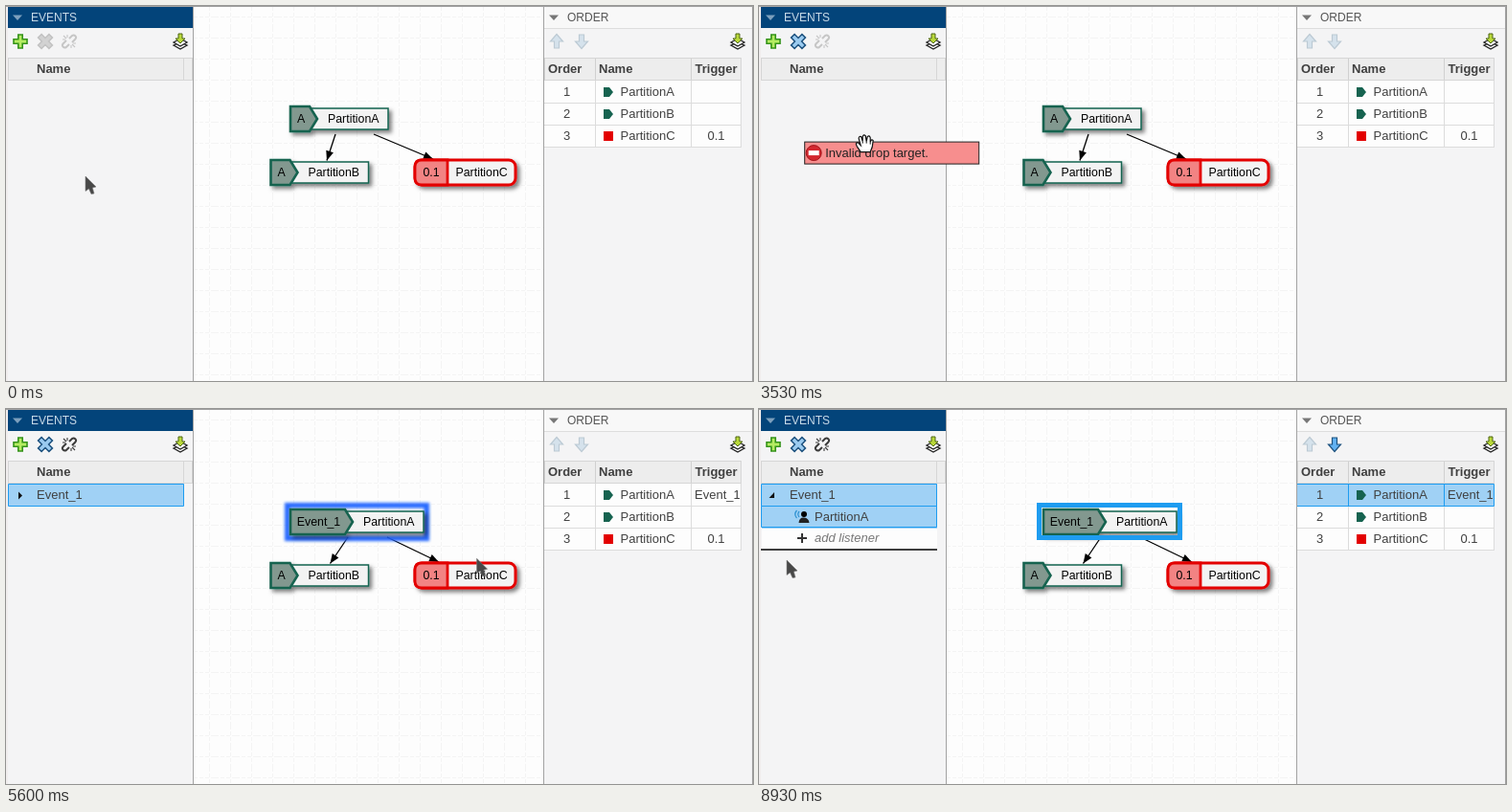
An HTML page that plays this animation: 780 px wide and 392 px high, repeating every 9400 ms.

```html
<!DOCTYPE html>
<html lang="en">
<head>
<meta charset="utf-8">
<title>Schedule editor</title>
<style>
  html, body { margin: 0; width: 100%; height: 100%; overflow: hidden; background: #fff; }
  svg { display: block; width: 780px; height: 392px; }
  text { font: 13px "Liberation Sans", Arial, sans-serif; fill: #404040; white-space: pre; }
  .cap { font-size: 12px; }
  .node { font-size: 12.35px; fill: #000; }
  .bold { font-weight: bold; }
  .hint { font-style: italic; fill: #777; }
</style>
</head>
<body>
<svg id="stage" viewBox="0 0 780 392">
  <defs>
    <filter id="shadow" x="-20%" y="-40%" width="150%" height="200%">
      <feDropShadow dx="3" dy="3" stdDeviation="2" flood-color="#000" flood-opacity=".5"/>
    </filter>
    <filter id="blur" x="-20%" y="-50%" width="140%" height="200%"><feGaussianBlur stdDeviation="1.6"/></filter>
    <pattern id="grid" x="196" y="1" width="22" height="22" patternUnits="userSpaceOnUse">
      <path d="M16.5 0V22M0 10.5H22" stroke="#f4f4f4" stroke-dasharray="4 2"/>
    </pattern>
    <clipPath id="trigger"><path d="M716 78H766V148H716Z"/></clipPath>
  </defs>
  <g id="base"></g>
  <g id="live"></g>
  <g id="pointer"></g>
</svg>
<script>
const LOOP = 9400;
const GREEN = '#166350', RED = '#e30000', BLUE = '#1e9cf0', PICKED = '#a0d1f5';
const EVENT_ADDED = 1330, PRESSED = 3060, DRAG = 3330, DROP = 4730, HAND_END = 5200,
      EXPAND = 7200, SELECT = 7400;
const $ = id => document.getElementById(id);

// Pointer path: time, x, y
const path = [
  [0, 83, 178], [30, 83, 178], [860, 12, 37], [1400, 12, 37], [2130, 17, 92], [2300, 17, 92],
  [2400, 20, 95], [2700, 65, 84], [3330, 65, 84], [3640, 150, 170], [4000, 294, 113],
  [4160, 331, 118], [5150, 331, 118], [5400, 430, 10], [5660, 497, 177], [5700, 497, 177],
  [6130, 260, 140], [6430, 124, 112], [6530, 146, 117], [6660, 146, 117], [6960, 13, 93],
  [8100, 13, 93], [8400, 99, 88], [8760, 28, 156], [8900, 28, 156], [8930, 29, 158], [LOOP, 29, 158]
];

const still = (a, b) => !a || !b || (a[1] === b[1] && a[2] === b[2]);

function slope(i, axis) {
  const [p, q, r] = [path[i - 1], path[i], path[i + 1]];
  return still(p, q) || still(q, r) ? 0 : (r[axis] - p[axis]) / (r[0] - p[0]);
}

function pointerAt(t) {
  const i = Math.max(0, path.findIndex(k => k[0] > t) - 1);
  const a = path[i], b = path[i + 1], span = b[0] - a[0], u = (t - a[0]) / span;
  const s = u * u * (3 - 2 * u);
  return [1, 2].map(n => a[n] + (b[n] - a[n]) * s +
    span * (slope(i, n) * u * (1 - u) ** 2 - slope(i + 1, n) * u * u * (1 - u)));
}

const text = (x, y, s, cls = '', extra = '') => `<text x="${x}" y="${y}" class="${cls}" ${extra}>${s}</text>`;
const rect = (x, y, w, h, fill, extra = '') =>
  `<rect x="${x}" y="${y}" width="${w}" height="${h}" fill="${fill}" ${extra}/>`;
const shape = (d, fill, stroke = 'none', width = 1, extra = '') =>
  `<path d="${d}" fill="${fill}" stroke="${stroke}" stroke-width="${width}" ${extra}/>`;
const line = (d, stroke, width = 1) => shape(d, 'none', stroke, width);
const at = (x, y, body) => `<g transform="translate(${x} ${y})">${body}</g>`;

const PLUS = 'M-2.2-7H2.2V-2.2H7V2.2H2.2V7H-2.2V2.2H-7V-2.2H-2.2Z';
const plusIcon = () => at(15, 37, shape(PLUS, '#b5ec62', '#35931b', 1.6));

function deleteIcon(on) {
  return `<g transform="translate(41 37) rotate(45) scale(1.15)">` +
    shape(PLUS, on ? '#9bcbf0' : '#d2d2d2', on ? '#1d527f' : '#c2c2c2', 1.3) + '</g>';
}

function unlinkIcon(on) {
  const c = on ? '#3c3c3c' : '#c6c6c6';
  return at(66, 37,
    line('M0-3 3-6Q5-7 6.500-5.500T6-2L3 1M0 3-3 6Q-5 7-6.500 5.500T-6 2L-3-1', c, 2) +
    line('M-6-6-3-3M3 3 6 6M-2-7V-4M-7-2H-4M2 4V7M4 2H7', c, 1.1));
}

function layersIcon(x) {
  return at(x, 37,
    shape('M-7 4 0 1 7 4 0 8Z', '#fff', '#222', 1.3) +
    shape('M-7 1 0-3 7 1 0 5Z', '#fff', '#222', 1.3) +
    shape('M-2-8H2V-3H5L0 2-5-3H-2Z', '#b9d83a', '#4c6512'));
}

function moveIcon(x, dir, on) {
  return `<g transform="translate(${x} 37) scale(1 ${dir})">` +
    shape('M-2.500-7H2.500V0H6.500L0 7.500-6.500 0H-2.500Z', on ? '#62b2f2' : '#d5e2ec', on ? '#1d527f' : '#bccad4', 1.2) + '</g>';
}

function arrow(x1, y1, x2, y2) {
  const turn = Math.atan2(y2 - y1, x2 - x1) * 180 / Math.PI;
  return line(`M${x1} ${y1}L${x2} ${y2}`, '#000', 1.3) +
    `<path transform="translate(${x2} ${y2}) rotate(${turn})" d="M0 0-10-4V4Z"/>`;
}

// Partition box with a pointed trigger tag on its left
function tagNode(x, y, tag, tagWidth, name, right) {
  const neck = x + tagWidth;
  return `<g filter="url(#shadow)">` + rect(x + 4, y + 2, right - x - 4, 22, '#f3f3f3', `stroke="${GREEN}" stroke-width="1.5"`) +
    shape(`M${x} ${y}H${neck}L${neck + 8} ${y + 13} ${neck} ${y + 26}H${x}Z`, '#82988f', GREEN, 2.6) + '</g>' +
    text(x + tagWidth / 2 + 1, y + 17, tag, 'node', 'text-anchor="middle"') +
    text(neck + 19, y + 17, name, 'node');
}

function timedNode() {
  const left = 'M461 161H434Q427 161 427 168V180Q427 187 434 187H461Z';
  return rect(427, 161, 105, 26, '#f3f3f3', `rx="7" stroke="${RED}" stroke-width="3" filter="url(#shadow)"`) +
    shape(left, '#f28383', RED, 2.8) +
    text(444, 178, '0.1', 'node', 'text-anchor="middle"') + text(469.5, 178, 'PartitionC', 'node');
}

function drawBase() {
  const title = (x, w, fill, tri, ink, label) => rect(x, 1, w, 22, fill) +
    shape(`M${x + 5} 9.500h10l-5 5.500z`, tri) + text(x + 24, 16, label, 'cap', `style="fill:${ink}"`);
  const head = (x, w) => rect(x, 54.5, w, 23, '#ededed', 'stroke="#d6d6d6"');
  $('base').innerHTML =
    rect(0, 0, 780, 392, '#f4f4f5') + rect(196, 0, 365, 392, '#fdfdfd') + rect(196, 1, 365, 391, 'url(#grid)') +
    rect(0, 0, 2, 392, '#f1eeee') +
    title(2, 193, '#03447a', '#7da0bd', '#c9dae8', 'EVENTS') + title(562, 218, '#f8f8f8', '#777', '#555', 'ORDER') +
    line('M562 23.500H780', '#ddd') +
    head(2.5, 183) + head(185.500, 9) + head(562.5, 205) + line('M615.500 55V77M715.500 55V77', '#d0d0d0') +
    text(32, 70, 'Name', 'bold') + text(566, 70, 'Order', 'bold') + text(619, 70, 'Name', 'bold') + text(719.5, 70, 'Trigger', 'bold') +
    line('M195.500 0V392M561.500 0V392M0 .5H780M779.500 0V392', '#a2a2a2') +
    plusIcon() + layersIcon(182) + layersIcon(764) + moveIcon(575, -1, false);
}

function orderTable(dropped, selected) {
  let out = rect(562, 78, 206, 70, '#fdfdfd') + (selected ? rect(562, 78, 206, 24, PICKED) : '');
  out += line('M562 101.500H768M562 124.500H768M562 147.500H768M615.500 78V148M715.500 78V148M767.500 78V148', '#dcdcdc');
  if (selected) out += line('M562 78.500H767.500V101.500H562M615.500 78V101M715.500 78V101', BLUE);
  ['A', 'B', 'C'].forEach((letter, i) => {
    const y = 90 + 23 * i;
    out += text(582, y + 4, i + 1) + text(641.5, y + 4, 'Partition' + letter) +
      (i < 2 ? shape(`M624 ${y - 5}h6l4 5-4 5h-6z`, GREEN) : rect(624, y - 5, 10, 10, RED));
  });
  return out + text(732.5, 140, '0.1') + (dropped ? text(719, 94, 'Event_1', '', 'clip-path="url(#trigger)"') : '');
}

function eventList(picked, expanded, hover) {
  let out = rect(3, 78, 183, expanded ? 69 : 23, picked ? PICKED : '#fff');
  if (expanded) {
    out += rect(3, 125, 183, 22, '#fdfdfd') + line('M2 147H186', '#000', 1.3) +
      line('M2.500 101.500H185.500V123.500H2.500Z', BLUE) + text(58, 117, 'PartitionA') +
      '<circle cx="47" cy="110" r="3"/>' + shape('M41.500 119Q42 113 47 113.500T52.500 119Z', '#222') +
      line('M42 107Q39.500 110 42 113M39.500 106Q36 110 39.500 114', '#2a8fd0', 1.2) +
      line('M40 135H50M45 130V140', '#333', 2) + text(58, 139, 'add listener', 'hint');
  }
  out += picked ? line('M2.500 78.500H185.500V101.500H2.500Z', BLUE) : line('M2 101.500H186', '#000', 1.3);
  out += expanded ? shape('M16 87V93H10.500Z', '#111') : shape('M13 86.500 17 90.500 13 94.500Z', '#111');
  if (hover) for (let i = 0; i < 6; i++) out += rect(4 + 3 * (i % 2), 86 + 3 * (i >> 1), 1.4, 1.4, '#8b9aa5');
  return out + text(32, 94, 'Event_1');
}

function glow(t) {
  const rise = Math.min(1, (t - DROP) / 200), fade = Math.min(1, Math.max(0, (6300 - t) / 1100));
  const k = rise * fade;
  if (t < DROP || k <= 0) return '';
  const pad = 1 + 3.5 * k;
  return rect(297 - pad, 104 - pad, 139 + 2 * pad, 28 + 2 * pad, 'none',
    `stroke="#1f63ff" stroke-width="${1.5 + 6.5 * k}" opacity="${Math.min(1, k * 1.5)}" filter="url(#blur)"`);
}

function pointer(t, x, y) {
  if (t < DRAG || t >= HAND_END)
    return at(x, y, shape('M0 0V15.500L3.500 13 6 18.500 9 18 7.300 12 11 11Z', '#484848', '#777', .6));
  const tip = t < DROP ? at(x - 63, y - 2,
    rect(.5, .5, 182, 23, '#f78e8e', 'stroke="#222"') + '<circle cx="10" cy="12" r="8" fill="#d3272e" stroke="#a3151b"/>' +
    rect(4.5, 9.5, 11, 5, '#fff') + text(22, 16, 'Invalid drop target.', '', 'style="fill:#222"')) : '';
  return tip + at(x, y, shape('M-4 9-8 3Q-10-1-7-1L-4 2-6-5Q-6-8-3.500-7L-2-2V-7Q-1-10 1-8L2-2 3-7Q5-9 6-6V-1Q7-5 9-3L8 4 6 9Z',
    '#fff', '#111', 1.2) + line('M-2-2V0M2-2V0M6-1V1', '#111'));
}

function render(t) {
  const [x, y] = pointerAt(t);
  const dropped = t >= DROP, selected = t >= SELECT, expanded = t >= EXPAND;
  const listed = t >= EVENT_ADDED && (t < DRAG || dropped);
  const hover = x < 186 && y >= 78 && y < 102;
  $('live').innerHTML =
    deleteIcon(t >= PRESSED) + unlinkIcon(dropped) + moveIcon(601, 1, selected) +
    (listed ? eventList(t >= PRESSED, expanded, hover) : '') + orderTable(dropped, selected) +
    (dropped ? arrow(357, 134, 338.5, 161.5) + arrow(398, 134, 452, 160) : arrow(344, 134, 335, 161.5) + arrow(384, 134, 446, 160)) +
    glow(t) +
    (dropped ? tagNode(297, 105, 'Event_1', 57, 'PartitionA', 436) : tagNode(297, 105, 'A', 20, 'PartitionA', 399)) +
    tagNode(276.5, 161, 'A', 20, 'PartitionB', 378.5) + timedNode() +
    (selected ? rect(292.5, 100.5, 147, 34, 'none', `stroke="${BLUE}" stroke-width="5"`) : '');
  $('pointer').innerHTML = pointer(t, x, y);
}

drawBase();
const start = performance.now();
function frame() {
  render((performance.now() - start) % LOOP);
  requestAnimationFrame(frame);
}
frame();
</script>
</body>
</html>
```
